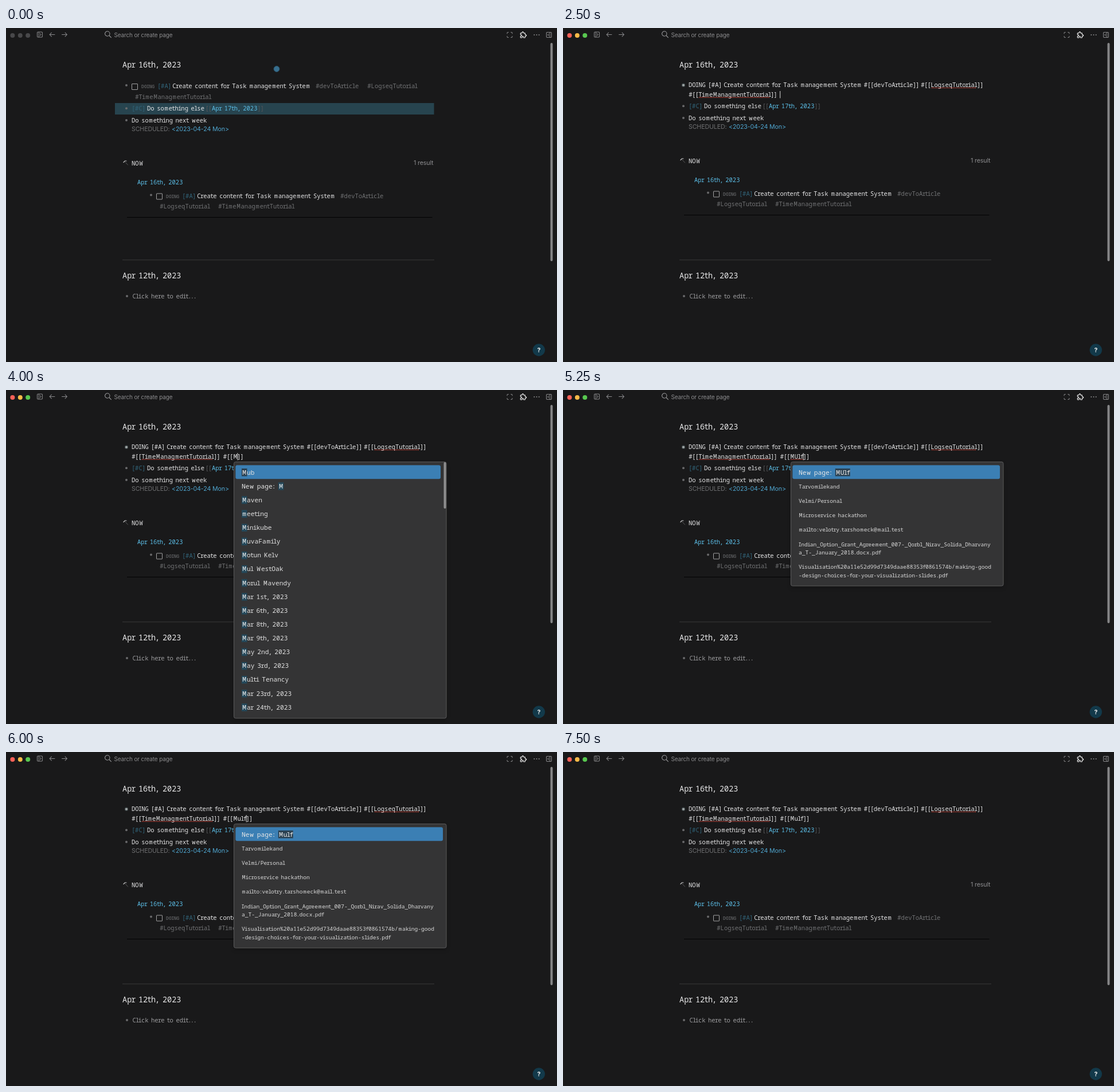
Write an HTML page that moves like this. It is 961 by 583 pixels and loops after 8 s.

```html
<!DOCTYPE html>
<html lang="en">
<head>
<meta charset="utf-8">
<title>Journal</title>
<style>
  html, body { margin: 0; width: 100%; height: 100%; overflow: hidden; background: #19191a; }
  svg { display: block; width: 961px; height: 583px; }
  text { white-space: pre; }
  .mono { font-family: "Noto Sans Mono", monospace; }
  .sans { font-family: Inter, sans-serif; letter-spacing: -.15px; }
  .icon { fill: none; stroke-linecap: round; stroke-linejoin: round; }
  .shadow { filter: drop-shadow(0 3px 3px rgb(0 0 0 / .2)); }
</style>
</head>
<body>
<svg id="stage" viewBox="0 0 961 583"></svg>
<script>
const LOOP = 8000;
const EM = 10.5;
const INK = '#e4e4e5', DIM = '#707173', LINK = '#5bbde6', PRIORITY = '#316378', FAINT = '#555658';

// Each row: start time and the values that change from then on.
const steps = [
  [0,    { dot: [472, 71.5], selected: true }],
  [250,  { dot: [451, 101.5] }],
  [500,  { dot: [451, 112.5] }],
  [750,  { dot: [450, 113] }],
  [1000, { dot: [447, 117] }],
  [1250, { dot: [429, 136], focused: true }],
  [1500, { dot: [441, 139] }],
  [1750, { editing: true, selected: false, caret: 0 }],
  [2000, { dot: [431, 121] }],
  [2250, { dot: null, caret: null }],
  [2500, { caret: 0 }],
  [3000, { typed: '#', caret: 1, popup: 'search', left: 385.5 }],
  [3500, { typed: '#[]', caret: 2, popup: null }],
  [3750, { typed: '#[[]]', caret: 3, popup: 'search', left: 397.5 }],
  [4000, { typed: '#[[M]]', caret: 4, popup: 'pages', query: 'M' }],
  [4250, { typed: '#[[MUlf]]', caret: 7, popup: 'create', query: 'MUlf' }],
  [4750, { caret: null }],
  [5250, { caret: 7, misspelt: true }],
  [5500, { typed: '#[[M]]', caret: 4, popup: 'pages', query: 'M', misspelt: false }],
  [5750, { typed: '#[[Mu]]', caret: 5, query: 'Mu' }],
  [6000, { typed: '#[[Mulf]]', caret: 7, popup: 'create', query: 'Mulf' }],
  [6500, { caret: null }],
  [7000, { caret: 9 }],
  [7250, { popup: null }],
  [7500, { caret: null }],
];
const states = [];
steps.reduce((state, [, change]) => {
  const next = { ...state, ...change };
  states.push(next);
  return next;
}, { typed: '', caret: null });

const pages = ['Mub', 'Maven', 'meeting', 'Minikube', 'MuvaFamily', 'Motun Kelv', 'Mul WestOak',
  'Morul Mavendy', 'Mar 1st, 2023', 'Mar 6th, 2023', 'Mar 8th, 2023', 'Mar 9th, 2023',
  'May 2nd, 2023', 'May 3rd, 2023', 'Multi Tenancy', 'Mar 23rd, 2023', 'Mar 24th, 2023'];

const suggestions = [
  [171.5, 'Tarvomilekand'],
  [196.5, 'Velmi/Personal'],
  [222, 'Microservice hackathon'],
  [247, 'mailto:velotry.tarshomeck@mail.test'],
  [272.5, 'Indian_Option_Grant_Agreement_007-_Qorbl_Nirav_Solida_Dharvany'],
  [287, 'a_T-_January_2018.docx.pdf'],
  [312, 'Visualisation%20a11e52d99d7349daae88353f0861574b/making-good'],
  [327, '-design-choices-for-your-visualization-slides.pdf'],
];

const escapeText = s => s.replace(/&/g, '&amp;').replace(/</g, '&lt;');

// Five-width spacing: wide, hash, normal, bracket and narrow letters.
function advance(c) {
  if (/[mwMW]/.test(c)) return 7.9;
  if (c === '#') return 6.6;
  if (/[[\]]/.test(c)) return 5.3;
  return /[ijltfrI.,: ]/.test(c) ? 4.55 : 6.3;
}
const widthOf = (s, scale = 1) => [...s].reduce((sum, c) => sum + advance(c), 0) * scale;

function mono(x, y, s, color = INK, scale = 1, weight = 400) {
  const size = EM * scale;
  let pen = x;
  const xs = [...s].map(c => {
    const step = advance(c) * scale;
    const at = pen + (step - size * .6) / 2;
    pen += step;
    return at.toFixed(2);
  });
  return `<text class="mono" x="${xs.join(' ')}" y="${y}" fill="${color}" font-size="${size}" font-weight="${weight}">${escapeText(s)}</text>`;
}
const sans = (x, y, s, color, size = 10.7, extra = '') =>
  `<text class="sans" x="${x}" y="${y}" fill="${color}" font-size="${size}" ${extra}>${escapeText(s)}</text>`;
const rect = (x, y, w, h, fill, extra = '') =>
  `<rect x="${x}" y="${y}" width="${w}" height="${h}" fill="${fill}" ${extra}/>`;
const circle = (x, y, r, fill, extra = '') => `<circle cx="${x}" cy="${y}" r="${r}" fill="${fill}" ${extra}/>`;
const line = (x1, x2, y, color, extra = '') =>
  `<path d="M${x1} ${y}H${x2}" stroke="${color}" ${extra}/>`;
const bullet = (x, y) => circle(x, y, 2, '#69696b');
const checkbox = (x, y) => rect(x, y, 10, 10, 'none', 'stroke="#a2a2a3" rx=".5"');
const squiggle = (x1, x2, y) => line(x1, x2, y, '#d8473a', 'stroke-width="1.4" stroke-dasharray="1.4 1.3"');

// Icons live on a 24-unit grid centred on (x, y).
const icon = (x, y, d, color = '#8b8b8d', scale = .56, weight = 1.8) =>
  `<path class="icon" transform="translate(${x} ${y}) scale(${scale}) translate(-12 -12)" d="${d}" stroke="${color}" stroke-width="${weight}"/>`;

function toolbar(focused) {
  const lights = focused ? ['#ff6158', '#f8ba48', '#58c750'] : Array(3).fill('#48484a');
  const frame = 'M6 4h12a2 2 0 0 1 2 2v12a2 2 0 0 1-2 2H6a2 2 0 0 1-2-2V6a2 2 0 0 1 2-2';
  const puzzle = 'M4 7h3a1 1 0 0 0 1-1V5a2 2 0 0 1 4 0v1a1 1 0 0 0 1 1h3a1 1 0 0 1 1 1v3a1 1 0 0 0 1 1h1' +
    'a2 2 0 0 1 0 4h-1a1 1 0 0 0-1 1v3a1 1 0 0 1-1 1h-3a1 1 0 0 1-1-1v-1a2 2 0 0 0-4 0v1a1 1 0 0 1-1 1H4' +
    'a1 1 0 0 1-1-1v-3a1 1 0 0 1 1-1h1a2 2 0 0 0 0-4H4a1 1 0 0 1-1-1V8a1 1 0 0 1 1-1';
  return lights.map((color, i) => circle(11.4 + 13.4 * i, 13, 4, color)).join('') +
    icon(59, 11.5, frame + 'M9 4v16M13 9l3 3-3 3') +
    icon(80.5, 11.5, 'M4 12h16M4 12l6 6M4 12l6-6') +
    icon(102, 11.5, 'M4 12h16M20 12l-6 6M20 12l-6-6') +
    icon(178, 11.2, 'M17 10a7 7 0 1 1-14 0a7 7 0 1 1 14 0M21 21l-6-6', '#9a9a9c', .6) +
    sans(188.5, 15.5, 'Search or create page', '#8b8b8d', 10) +
    icon(878.5, 12, 'M4 8V6a2 2 0 0 1 2-2h2M4 16v2a2 2 0 0 0 2 2h2M16 4h2a2 2 0 0 1 2 2v2M16 20h2a2 2 0 0 0 2-2v-2') +
    icon(902.5, 11.8, puzzle, '#f0f0f0', .58, 2) +
    [921.3, 925.5, 929.7].map(x => circle(x, 12, 1, '#8b8b8d')).join('') +
    icon(947, 12, frame + 'M15 4v16M11 9l-3 3 3 3');
}

function task(x, y, tagX) {
  return bullet(x - 10, y - 5) + checkbox(x - .5, y - 7.5) +
    mono(x + 16, y, 'DOING', FAINT, .78, 700) +
    mono(x + 44.5, y, '[#A]', PRIORITY) +
    mono(x + 70.3, y, 'Create content for Task management System') +
    mono(tagX, y, '#devToArticle', DIM);
}

function viewedBlock() {
  return task(220, 105, 540) +
    mono(630, 105, '#LogseqTutorial', DIM) +
    mono(225, 123.5, '#TimeManagmentTutorial', DIM);
}

function editedBlock({ typed, caret, misspelt }) {
  const start = 378.7;
  let out = circle(210, 99.7, 3.2, '#3d4547') + circle(210, 99.7, 2, '#a3a9a9') +
    mono(219, 103.4, 'DOING [#A]') +
    mono(280.3, 103.4, 'Create content for Task management System') +
    mono(524.6, 103.4, '#[[devToArticle]]') +
    mono(624, 103.4, '#[[LogseqTutorial]]') +
    mono(219, 120.2, '#[[TimeManagmentTutorial]]') +
    squiggle(643, 720, 104.5) + squiggle(237, 361, 121.3) +
    mono(start, 120.2, typed);
  if (misspelt) out += squiggle(397, 420, 121.3);
  if (caret !== null) out += rect(start - .5 + widthOf(typed.slice(0, caret)), 110, 1, 12.5, '#d8d8d8');
  return out;
}

function lowerBlocks(selected) {
  return (selected ? rect(190, 131, 556.5, 20, '#27444f') : '') +
    bullet(210, 140.3) +
    mono(219.5, 144, '[#C]', PRIORITY) +
    mono(246, 144, 'Do something else') +
    mono(348, 144, '[[', FAINT) + mono(359, 144, 'Apr 17th, 2023', LINK) + mono(439, 144, ']]', FAINT) +
    bullet(210, 161) +
    mono(219, 164.8, 'Do something next week') +
    sans(219, 179.5, 'SCHEDULED:', DIM) + sans(289, 179.5, '<2023-04-24 Mon>', '#4fa5cf') +
    '<path class="icon" d="M208 234l4.5 5" stroke="#5a5a5a"/>' +
    '<path class="icon" d="M205 234.5l2.5-2.5h2.5" stroke="#c4c4c4" stroke-width="1.2"/>' +
    mono(219, 239.8, 'NOW') + sans(711, 239, '1 result', '#8e8e90') +
    mono(229, 273, 'Apr 16th, 2023', LINK) +
    task(263, 296.5, 583) +
    mono(268, 314.5, '#LogseqTutorial', DIM) + mono(370, 314.5, '#TimeManagmentTutorial', DIM) +
    line(211, 743.5, 330.5, '#020202');
}

function match(x, y, s, current) {
  const scale = 1.07;
  return rect(x - .5, y - 10.5, widthOf(s, scale) + 1, 13.5, current ? '#2b4152' : '#24485a') +
    mono(x, y, s, '#f2f2f2', scale, current ? 400 : 500);
}

function createRow(y, query, current) {
  const label = 'New page: ';
  return mono(411, y, label, '#e6e6e6', 1.07) + match(411.8 + widthOf(label, 1.07), y, query, current);
}

function pageRow(y, name, query, current) {
  const found = name.startsWith(query) ? query : name[0];
  return match(411.5, y, found, current) +
    mono(411.5 + widthOf(found, 1.07), y, name.slice(found.length), '#e0e0e0', 1.07);
}

function popup({ popup: kind, left, query }) {
  if (!kind) return '';
  const height = { search: 30.5, pages: 447.5, create: 216.5 }[kind];
  const box = rect(left, 125.5, 370.5, height, kind === 'search' ? '#303031' : '#343435',
    'class="shadow" stroke="#5a5a5b" rx="3"');
  if (kind === 'search') return box + sans(left + 11, 144.7, 'Search for a page', '#8a8a8b', 10.4);

  const current = rect(400.3, 131.2, kind === 'pages' ? 357.7 : 361.7, 24.1, '#3b7fb4', 'rx="3"');
  if (kind === 'create') {
    return box + current + createRow(147.5, query, true) +
      suggestions.map(([y, s]) => mono(411, y, s, '#d8d8d8', .915)).join('');
  }
  const matches = name => name.toLowerCase().startsWith(query.toLowerCase());
  const ranked = [...pages].sort((a, b) => matches(b) - matches(a));
  const rowY = i => 147.5 + 24.13 * i;
  return box + current + createRow(rowY(1), query, false) +
    ranked.map((name, i) => pageRow(rowY(i ? i + 1 : 0), name, query, i === 0)).join('') +
    rect(763.5, 126, 4, 81, '#8d8d8e', 'rx="2"');
}

function scene(state) {
  return toolbar(state.focused) +
    mono(203, 68.5, 'Apr 16th, 2023', INK, 1.29) +
    (state.editing ? editedBlock(state) : viewedBlock()) +
    `<g transform="translate(0 ${state.editing ? -4 : 0})">${lowerBlocks(state.selected)}</g>` +
    line(203, 747, 404.8, '#39393a') +
    mono(203, 437, 'Apr 12th, 2023', INK, 1.29) +
    bullet(211, 468) + mono(220.5, 472, 'Click here to edit...', '#9c9c9e') +
    rect(949.5, 26, 4, 381, '#868687', 'rx="2"') +
    circle(929.3, 562, 10.7, '#12394a') +
    sans(929.3, 565.8, '?', '#f0f0f0', 10.5, 'text-anchor="middle" font-weight="700"') +
    popup(state) +
    (state.dot ? circle(...state.dot, 5, '#376f8f', 'stroke="#2a5269"') : '');
}

const stage = document.getElementById('stage');
const began = performance.now();
let shown = -1;

function tick() {
  const time = (performance.now() - began) % LOOP;
  const index = steps.findLastIndex(([at]) => at <= time);
  if (index !== shown) {
    shown = index;
    stage.innerHTML = scene(states[index]);
  }
  requestAnimationFrame(tick);
}
tick();
</script>
</body>
</html>
```
